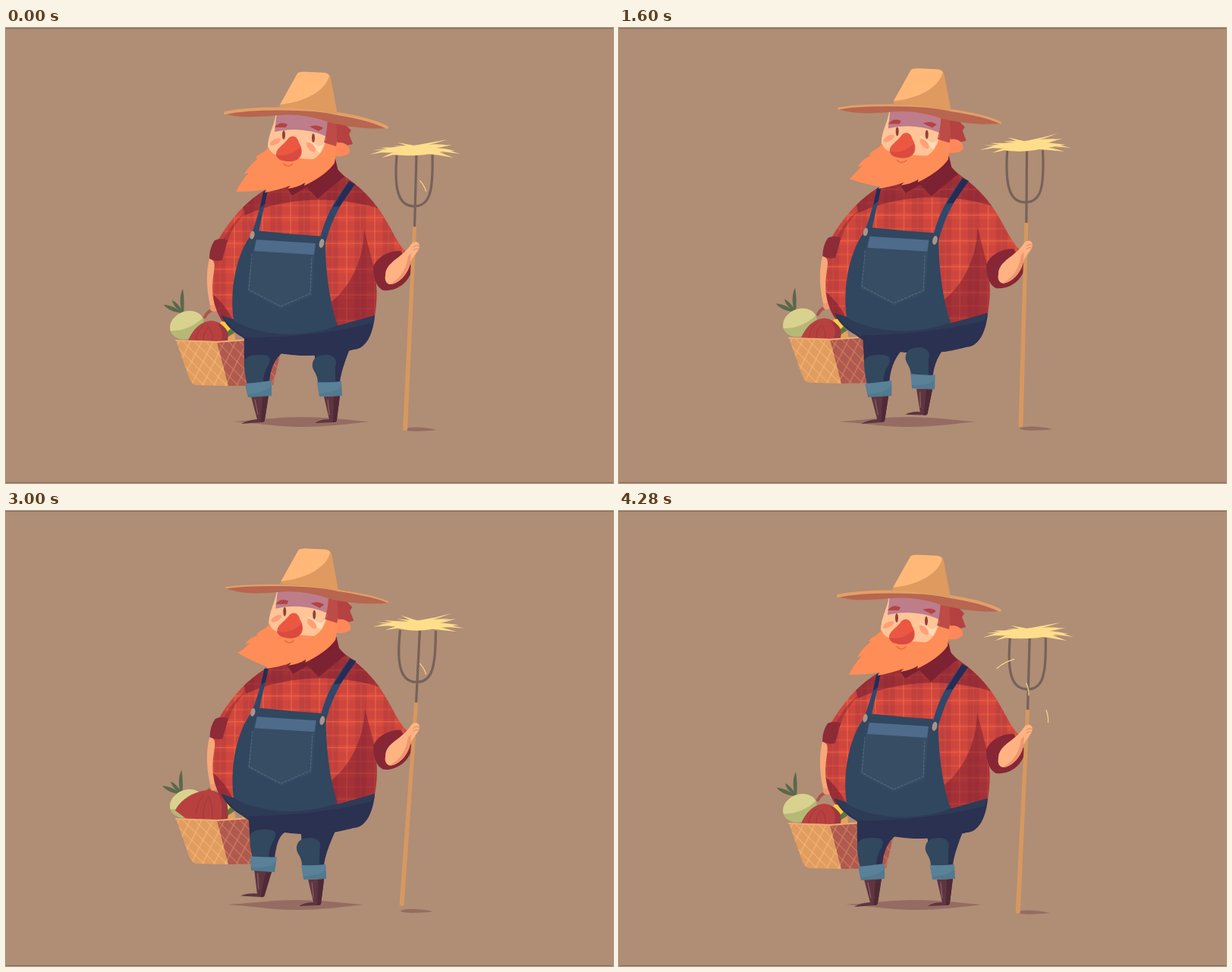
An HTML page for the animation above (4.32 s loop, 800 px wide and 600 px high).

```html
<!DOCTYPE html>
<html lang="en">
<head>
<meta charset="utf-8">
<title>Farmer</title>
<style>
  html, body { margin: 0; width: 100%; height: 100%; overflow: hidden; background: #b08d75; }
  svg { display: block; width: 100vw; height: 100vh; }
  .thin { fill: none; stroke-linecap: round; }
</style>
</head>
<body>
<svg viewBox="0 0 800 600">
  <defs>
    <pattern id="plaid" width="37" height="34" x="15" y="15" patternUnits="userSpaceOnUse">
      <rect width="37" height="34" fill="#d94a3d"/>
      <path d="M0 8H37M0 22H37" stroke="#b63c3e" stroke-width="11" opacity=".32"/>
      <path d="M8 0V34" stroke="#a8353b" stroke-width="15" opacity=".38"/>
      <path d="M27 0V34M0 31H37" stroke="#f9774c" stroke-width="1.200" opacity=".6"/>
      <path d="M8 0V34M0 15H37" stroke="#f06a4a" stroke-width=".8" opacity=".35"/>
    </pattern>
    <pattern id="weave" width="15" height="20" patternUnits="userSpaceOnUse" patternTransform="skewX(14)">
      <path d="M0 0L15 20M15 0L0 20" stroke="#ffc680" stroke-width="1" fill="none"/>
    </pattern>
    <clipPath id="shirtClip"><use href="#shirt"/></clipPath>
    <clipPath id="greenClip"><ellipse cx="238.500" cy="392" rx="23" ry="18" transform="rotate(-22 238 392)"/></clipPath>
  </defs>

  <rect width="800" height="600" fill="#b08d75"/>
  <path d="M0 .5H800M0 599.500H800" stroke="#846b5f"/>
  <path id="shade" d="M299 519C345 516 360 513 390 513C425 513 450 517 478 519C445 523 420 526 390 526C355 526 335 521 299 519Z" fill="#956c62"/>
  <path id="forkShade" d="M524 529C532 525 552 526 568 530C550 532 530 533 524 529Z" fill="#956c62"/>

  <g id="basket">
    <path d="M262 381Q267 370 280 371" class="thin" stroke="#a9554b" stroke-width="4"/>
    <g id="leaves" fill="#59694a">
      <path d="M233 377C228 364 229 352 233 344C235 354 235 366 234 377Z"/>
      <path d="M233 376C225 371 220 365 219 359C225 362 230 368 234 375Z"/>
      <path d="M232 376C222 375 212 371 208 365C217 365 226 370 233 376Z"/>
    </g>
    <g clip-path="url(#greenClip)">
      <rect x="210" y="365" width="60" height="55" fill="#b5b975"/>
      <path d="M210 398C222 402 248 397 263 378L255 362L212 370Z" fill="#d9d28e"/>
    </g>
    <path d="M277 397L286 384L297 392L291 408Z" fill="#f8cb45"/>
    <path d="M287 404L296 397L301 401L298 413H288Z" fill="#5c7542"/>
    <path d="M293 407L301 402L303 415H290Z" fill="#e5a15f"/>
    <path id="beet" fill="#b8413f"/>
    <path id="beetShade" fill="#9b3840"/>
    <path id="beetLines" class="thin" stroke="#983a3d"/>
    <path d="M277 414L321 410L362 427L352 471L292 472Z" fill="#b0594f"/>
    <path d="M224 412L278 414L293 472L251 471Q245 470 242 463Z" fill="#e19c60"/>
    <path d="M224 412L278 414L293 472L251 471Q245 470 242 463Z" fill="url(#weave)" opacity=".7"/>
    <path d="M277 414L321 410L362 427L352 471L292 472Z" fill="url(#weave)" opacity=".42"/>
    <path d="M224 412L278 414L320 411" class="thin" stroke="#efad70" stroke-width="2"/>
  </g>

  <g id="leftArm">
    <path d="M268 304C263 323 264 350 271 373L280 373C274 345 273 325 280 304Z" fill="#f6a879"/>
    <path d="M270 366Q267 374 274 374L283 372V363Z" fill="#ef9870"/>
  </g>

  <g id="body">
    <path d="M362 195L434 172L440 198L400 215L372 213Z" fill="#7b2030"/>
    <path id="shirt" d="M346 211C318 226 295 252 277 284L272 306C282 313 259 345 285 387L440 398L485 387C491 352 488 335 486 318L530 298C505 276 505 236 447 196C438 188 430 190 420 200L372 208Z" fill="url(#plaid)"/>
    <g clip-path="url(#shirtClip)" fill="#66152f">
      <path d="M300 180H510L503 242C450 222 375 219 315 247Z" opacity=".48"/>
      <path d="M472 266C471 312 450 346 423 366L430 400H495L486 320Z" opacity=".42"/>
      <path d="M262 342C284 360 296 374 304 398H262Z" opacity=".48"/>
      <path d="M316 243C300 255 290 269 286 282L292 283C296 266 306 254 316 243Z" opacity=".3"/>
    </g>
    <path d="M369 209L393 202L399 208L377 221Z" fill="#7b2030"/>
    <path d="M393 207C410 200 425 191 434 183L446 196C434 206 422 215 411 225Z" fill="#7d2232"/>
    <path d="M268 304Q268 290 275 280Q284 276 292 280L285 306Q276 309 268 304Z" fill="#8d2b37"/>

    <path d="M284 379C300 392 325 401 355 402L440 392L486 379C484 404 474 424 458 424C440 429 425 432 395 432C360 432 330 423 312 408C298 400 288 390 284 379Z" fill="#2b3150"/>
    <path d="M284 379C291 390 302 400 318 410C340 406 400 410 482 389L486 379L440 392L350 400Z" fill="#2d3b57"/>
    <g id="bib">
      <path d="M339 216L345 213C341 235 336 252 332 274L322 275C330 255 335 237 339 216Z" fill="#30486a"/>
      <path d="M452 202L460 206C440 232 427 257 420 288L412 287C418 252 434 226 452 202Z" fill="#30486a"/>
      <path d="M339 216L345 213L341 233L335 237ZM452 202L460 206L440 235L431 236Z" fill="#252c56"/>
      <path d="M329 267C360 270 390 273 421 275C420 315 427 366 437 392C405 407 340 410 300 386C293 335 309 284 329 267Z" fill="#30475f"/>
      <path d="M329 279L408 284L403 353L362 370L318 347Q321 313 329 279Z" fill="#364d64"/>
      <path d="M330 279L408 284L406 299L327 294Z" fill="#4e6b8b"/>
      <path d="M324 298L320 345L362 367L401 350L403 302" class="thin" stroke="#6d8699" stroke-dasharray="3 2" opacity=".55"/>
      <ellipse cx="324.500" cy="273" rx="3" ry="5.500" fill="#aa9489" transform="rotate(12 324 273)"/>
      <ellipse cx="416" cy="284" rx="3.200" ry="6" fill="#aa9489" transform="rotate(12 416 284)"/>
    </g>
  </g>

  <path id="backL" fill="#2b3150"/><path id="frontL" fill="#31485f"/>
  <g id="footL">
    <path d="M323 486L346 484L341 517Q341 520 336 520L310 522Q318 517 331 516Z" fill="#5f3541"/>
    <path d="M338 487L346 485L341 517Q341 520 336 520Z" fill="#4f2a36"/>
    <path d="M328 490L332 510" class="thin" stroke="#8b6266" stroke-width="1.200"/>
    <path d="M315 469Q332 468 350 465V485L319 487Z" fill="#517990"/>
    <path d="M315 469L350 465V469Q348 480 319 483Z" fill="#628aa0" opacity=".5"/>
  </g>
  <path id="backR" fill="#2b3150"/><path id="frontR" fill="#31485f"/>
  <g id="footR">
    <path d="M419 486L440 485L436 517Q436 520 431 520L407 521Q414 516 426 516Z" fill="#5f3541"/>
    <path d="M432 486L440 485L436 517Q436 520 431 520Z" fill="#4f2a36"/>
    <path d="M424 490L426 510" class="thin" stroke="#8b6266" stroke-width="1.200"/>
    <path d="M410 467Q426 468 442 466L443 485L413 486Z" fill="#517990"/>
    <path d="M410 467Q426 468 442 466V471Q440 480 412 482Z" fill="#628aa0" opacity=".5"/>
  </g>

  <path id="cuff" d="M484 315C488 303 505 293 520 294L535 315C535 330 519 348 497 346C488 342 484 329 484 315Z" fill="#872735"/>
  <g id="fork">
    <path d="M515 168C511 215 518 235 538 235C559 235 563 215 562 168M541 165L538.500 262" class="thin" stroke="#76625b" stroke-width="3.200"/>
    <path d="M536 262H541L529 530Q526 532 523 530Z" fill="#d69860"/>
    <path id="hay" fill="#ffde8b"/>
  </g>
  <g id="hand">
    <path d="M500 325C500 307 522 303 534 284C538 279 545 280 545 287C544 294 537 299 533 308C530 325 515 338 505 337C500 335 499 330 500 325Z" fill="#ffb383"/>
    <path d="M505 337C517 331 527 321 530 300L534 296L533 308C530 325 515 338 505 337Z" fill="#f0966e"/>
    <path d="M537 288Q541 284 545 287M537 292Q540 289 543 290" class="thin" stroke="#e18562"/>
  </g>
  <g id="loose" class="thin" stroke="#f5d488" stroke-width="1.300"></g>

  <g id="head">
    <path d="M424 113L445 116L449 129L455 135L452 140L457 153L441 157L424 155Z" fill="#b54141"/>
    <path d="M432 154C440 147 454 153 453 164Q447 171 433 169Z" fill="#ff885a"/>
    <path d="M356 111C354 129 345 140 345 157C350 180 398 184 414 170L430 150L427 112Z" fill="#ffc497"/>
    <path d="M357 111L425 113L424 144C405 134 377 131 354 137Z" fill="#bd7d8b"/>
    <path id="beard" fill="#ff8d57"/>
    <path d="M424 114L437 116C433 130 439 142 435 156L419 151Q424 135 424 114Z" fill="#bd4b46"/>
    <path d="M395 146Q405 159 414 165L423 143Q420 155 412 156Z" fill="#ffdcb5"/>
    <ellipse cx="355" cy="150" rx="8" ry="3.500" transform="rotate(-28 355 150)" fill="#ff9f78"/>
    <ellipse cx="402" cy="157" rx="8" ry="4" transform="rotate(48 402 157)" fill="#ff9f78"/>
    <path d="M354 131Q361 122 371 127L369 131ZM400 130Q411 126 418 132L412 136Z" fill="#b54343"/>
    <ellipse cx="366" cy="141" rx="2" ry="6" fill="#944039"/>
    <ellipse cx="405" cy="145" rx="2" ry="6" fill="#944039"/>
    <path d="M356 168C355 159 365 155 371 147C376 140 384 142 386 151C394 164 389 176 374 176C364 176 358 174 356 168Z" fill="#ec5742"/>
    <path d="M356 167Q374 171 388 157Q391 175 374 176Q359 175 356 167Z" fill="#d94a40"/>
    <path d="M366 179Q372 185 378 179" class="thin" stroke="#ed6542" stroke-width="1.500"/>
    <path id="brim" fill="#b8664f"/>
    <path id="brimTop" class="thin" stroke="#e3a067"/>
    <path d="M360 104L384 60Q386 57 399 58L420 59Q427 60 428 66L437 114Q400 106 360 104Z" fill="#df9a60"/>
    <path d="M361 101L384 60Q386 57 399 58L420 59Q425 60 426 63C421 82 397 97 361 101Z" fill="#ffb877"/>
  </g>
</svg>
<script>
const LOOP = 4320, STEP = 40, FALL = 600;
const el = Object.fromEntries([...document.querySelectorAll('[id]')].map(e => [e.id, e]));
const draw = (id, d) => el[id].setAttribute('d', d);
const move = (id, x, y, turn = '') => el[id].setAttribute('transform', `translate(${x} ${y}) ${turn}`);
const clamp = v => Math.max(0, Math.min(1, v));
const arch = (t, from, to) => Math.sin(Math.PI * clamp((t - from) / (to - from)));

// Straw tips: left x, y, right x, y, sag, thickness
const straws = [
  [479, 167, 574, 159, -10, 4], [484, 161, 582, 147, 6, 3], [495, 171, 580, 154, -8, 5],
  [510, 156, 599, 166, -5, 4], [500, 162, 590, 171, -9, 5], [493, 158, 588, 154, 5, 5],
  [507, 167, 572, 164, -3, 8], [488, 164, 592, 162, -5, 8], [516, 151, 578, 165, 2, 4]
];
// Loose straws: phase, x, y, angle
const paths = [
  [[40, 508, 194, -27], [80, 509, 201, -28], [160, 521, 240, 6], [210, 526, 245, 0]],
  [[-90, 551, 207, 60], [0, 550, 208, 60], [40, 537, 220, 107], [80, 539, 235, 79], [160, 550, 254, 6], [210, 562, 265, -40]],
  [[40, 564, 265, 94], [90, 565, 272, 78]]
];
const loose = paths.map(() => {
  const p = document.createElementNS('http://www.w3.org/2000/svg', 'path');
  el.loose.append(p);
  return p;
});

function drawHay(k) {
  const lift = -4 * k;
  draw('hay', straws.map(([x, y, X, Y, sag, w]) => {
    const mx = (x + X) / 2, my = (y + Y) / 2 + sag + 2 * k;
    y += lift; Y += lift;
    return `M${x} ${y}Q${mx} ${my - w} ${X} ${Y}Q${mx} ${my + w} ${x} ${y}Z`;
  }).join(''));
}

function drawLoose(t) {
  const phase = t % FALL;
  paths.forEach((keys, i) => {
    const now = phase > 400 ? phase - FALL : phase;
    const n = keys.findIndex((key, j) => j && now >= keys[j - 1][0] && now <= key[0]);
    loose[i].setAttribute('visibility', n < 1 ? 'hidden' : 'visible');
    if (n < 1) return;
    const a = keys[n - 1], b = keys[n], f = (now - a[0]) / (b[0] - a[0]);
    const [, x, y, turn] = a.map((v, j) => v + (b[j] - v) * f);
    const half = i ? 8 : 13;
    loose[i].setAttribute('d', `M${-half} .5Q0 ${-half / 6} ${half} .5`);
    loose[i].setAttribute('transform', `translate(${x} ${y}) rotate(${turn})`);
  });
}

// The beet tips up and shows more of its left side as it hops
function drawBeet(hop) {
  const x = 240 - 17 * hop, y = 412 - 11 * hop, top = 386 - 12 * hop;
  draw('beet', `M${x} ${y}C${x + 5} ${y - 12} ${255 - 9 * hop} ${top + 1} ${270 - 3 * hop} ${top}
    C288 ${top + 1} 294 ${402 - 6 * hop} 292 418H${242 + 4 * hop}Z`);
  draw('beetShade', `M278 ${top + 3}C296 ${top + 10} 293 405 291 416H282C287 404 285 ${top + 10} 278 ${top + 3}Z`);
  draw('beetLines', `M250 ${412 - 6 * hop}Q252 ${398 - 8 * hop} 261 ${top + 6}M260 412Q259 ${403 - 6 * hop} 267 ${top + 8}
    M272 412Q273 ${404 - 6 * hop} 268 ${top + 10}`);
}

function drawHead(k) {
  const tip = 216 - 24 * k, edge = -10 * k, bend = -3 * k;
  draw('beard', `M346 157C342 164 331 166 329 172L332 172Q318 ${184 + edge} 314 ${193 + edge}L320 ${191 + edge}
    Q309 ${203 + edge} 303 ${tip}Q324 ${216 + edge} 343 ${213 + k}L341 ${217 - k}Q361 ${213 + k} 375 208
    L371 212Q385 210 394 204L393 208Q422 194 433 178L437 151L424 132C423 151 417 167 405 173
    Q388 173 374 169Q350 171 346 157Z`);
  draw('brim', `M287 ${112 + bend}C320 105 400 102 437 112C470 117 494 ${126 + bend} 504 ${132 + bend}
    C478 ${134 + bend} 455 131 425 124C395 114 376 113 350 116C320 118 300 ${118 + bend} 287 ${112 + bend}Z`);
  draw('brimTop', `M289 ${112 + bend}C320 105 400 104 437 113C470 118 492 ${126 + bend} 502 ${131 + bend}`);
  el.brimTop.setAttribute('stroke-width', 4 - 2 * k);
}

function drawLegs(t, p, u) {
  const lx = 11 * p, rx = -31 * p;
  const ly = -14 * arch(t, 2500, 4250), ry = -18 * arch(t, 50, 1940);
  const tiltL = arch(t, 2700, 4250), tiltR = arch(t, 50, 1940);
  const hip = -6 * u;
  move('footL', lx - 3 * tiltL, ly, `rotate(${14 * tiltL} 333 475)`);
  move('footR', rx, ry, `rotate(${8 * tiltR} 427 475)`);
  const lh = lx * .8, rh = rx * .8;
  draw('backL', `M${314 + lh} ${407 + hip}C${313 + lx} ${435 + ly} ${315 + lx} ${452 + ly} ${318 + lx} ${470 + ly}
    L${347 + lx} ${468 + ly}C${348 + lx} ${452 + ly} ${353 + lx} ${436 + ly} ${366 + lh} ${427 + hip}L${366 + lh} ${415 + hip}Z`);
  draw('frontL', `M${314 + lx} ${439 + ly}Q${318 + lx} ${430 + ly} ${334 + lx} ${431 + ly}Q${353 + lx} ${430 + ly} ${346 + lx} ${444 + ly}
    Q${339 + lx} ${455 + ly} ${339 + lx} ${468 + ly}L${318 + lx} ${470 + ly}Q${313 + lx} ${451 + ly} ${314 + lx} ${439 + ly}Z`);
  draw('backR', `M${405 + rh} ${420 + hip}L${455 + rh} ${418 + hip}C${447 + rx} ${439 + ry} ${441 + rx} ${455 + ry} ${440 + rx} ${468 + ry}
    L${412 + rx} ${468 + ry}Z`);
  draw('frontR', `M${404 + rx} ${442 + ry}Q${406 + rx} ${430 + ry} ${425 + rx} ${431 + ry}Q${438 + rx} ${434 + ry} ${434 + rx} ${447 + ry}
    L${434 + rx} ${468 + ry}H${411 + rx}Q${411 + rx} ${460 + ry} ${406 + rx} ${452 + ry}Q${403 + rx} ${447 + ry} ${404 + rx} ${442 + ry}Z`);
}

function render(t) {
  const turn = 2 * Math.PI * t / LOOP;
  const k = (1 - Math.cos(2 * turn)) / 2;  // body rise, twice per loop
  const u = k ** 1.2;
  const p = (1 - Math.cos(turn)) / 2;      // foot travel
  const sway = Math.sin(turn);

  move('shade', -11 * p, 0);
  move('forkShade', 5 * sway, -2 * k);
  move('basket', 0, -7 * u);
  move('leaves', -2 * u, 4 * u);
  move('leftArm', 0, -6 * u);
  move('body', 3.4 * u, -7 * u, `skewX(${-.5 * u})`);
  move('bib', 0, -2 * u);
  move('cuff', 0, -6 * u);
  move('hand', 0, 1 - 3 * u);
  move('head', 1.5 * u, -9.5 * u);
  move('fork', -1.6 * sway, -11 * u, `rotate(${-1.5 * sway} 539 285)`);
  drawBeet(clamp((k - .65) / .2));
  drawHead(k);
  drawLegs(t, p, u);
  drawHay(k);
  drawLoose(t);
}

const start = performance.now();
function tick() {
  const t = (performance.now() - start) % LOOP;
  render(Math.floor(t / STEP) * STEP);
  requestAnimationFrame(tick);
}
tick();
</script>
</body>
</html>
```
